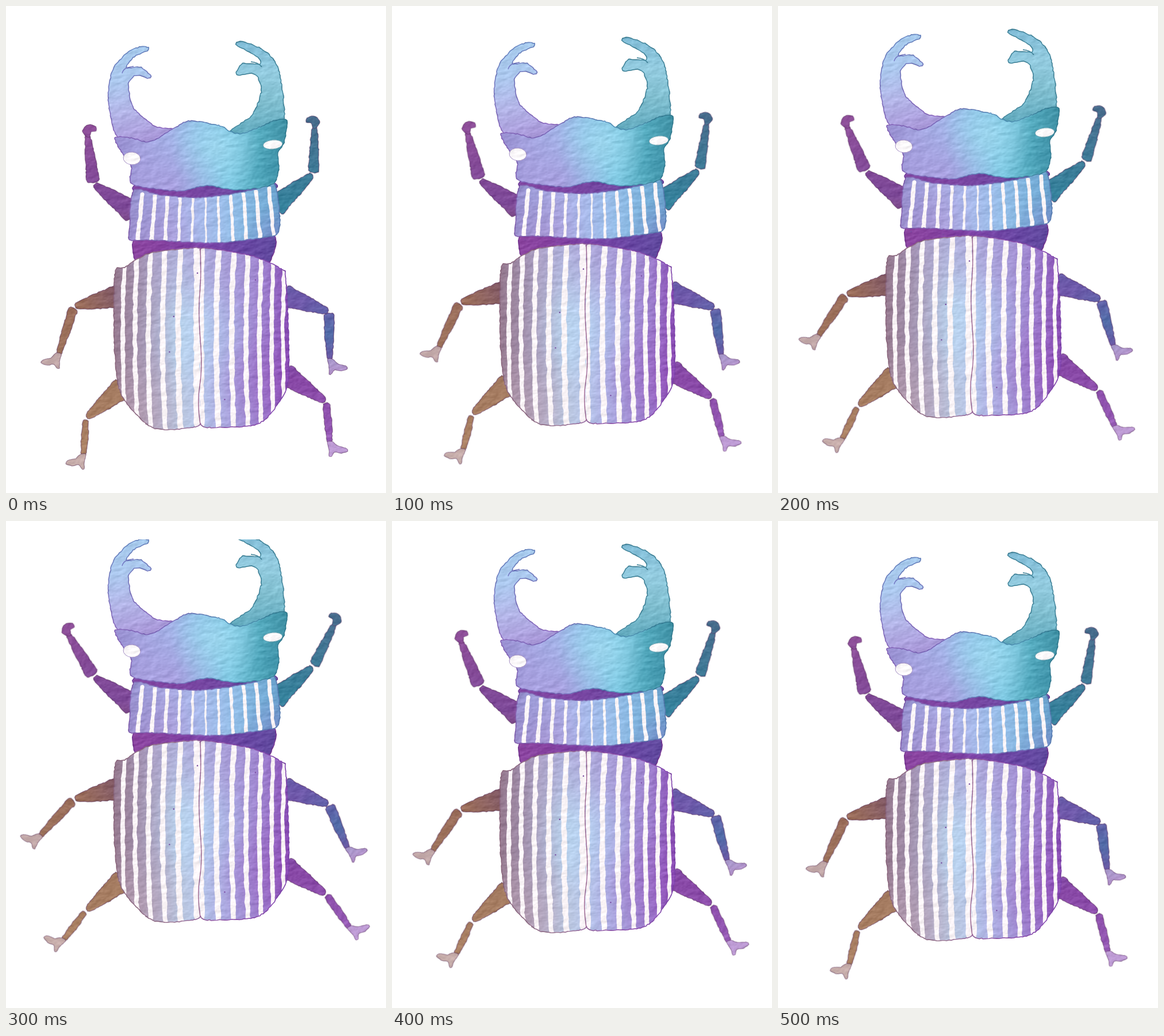
Write an HTML page with a canvas that moves like this. It is 661 px wide and 847 px high and loops after 600 ms.

```html
<!DOCTYPE html>
<html lang="en">
<head>
<meta charset="utf-8">
<title>Watercolour beetle</title>
<style>
html, body { margin: 0; width: 100%; height: 100%; overflow: hidden; background: #fff; }
canvas { display: block; width: 661px; height: 847px; }
</style>
</head>
<body>
<canvas id="stage" width="661" height="847"></canvas>
<script>
const W = 661, H = 847;
const stage = document.getElementById('stage').getContext('2d');
let ctx;

let seed = 7;
const rand = () => (seed = (seed * 16807) % 2147483647) / 2147483647;
const jitter = a => (rand() - 0.5) * 2 * a;
const mix = (a, b, t) => a + (b - a) * t;

// Paper relief from value noise on a wrapping lattice
const N = 128;
const lattice = Float32Array.from({ length: N * N }, rand);
function noise(x, y) {
  const ix = Math.floor(x), iy = Math.floor(y);
  const ease = f => f * f * (3 - 2 * f);
  const u = ease(x - ix), v = ease(y - iy);
  const at = (i, j) => lattice[((iy + j) & (N - 1)) * N + ((ix + i) & (N - 1))];
  return mix(mix(at(0, 0), at(1, 0), u), mix(at(0, 1), at(1, 1), u), v);
}
const relief = new Float32Array(W * H);
for (let y = 0; y < H; y++)
  for (let x = 0; x < W; x++)
    relief[y * W + x] = noise(x / 11 + y / 40, y / 6) + 0.35 * noise(x / 4, y / 2.5 + x / 20);

function grain() {
  const img = ctx.getImageData(0, 0, W, H), d = img.data;
  for (let i = 2 * W; i < W * (H - 2); i++) {
    if (!d[i * 4 + 3]) continue;
    const k = (relief[i + W + 1] - relief[i - W - 1]) * 30 + 2;
    for (let c = 0; c < 3; c++) d[i * 4 + c] += k;
  }
  ctx.putImageData(img, 0, 0);
}

// Closed Catmull-Rom outline through the points, with a slightly torn edge
function outline(p, rough = 0.8) {
  const path = new Path2D(), len = p.length;
  p.forEach((b, i) => {
    const a = p[(i + len - 1) % len], c = p[(i + 1) % len], d = p[(i + 2) % len];
    const steps = Math.max(2, Math.round(Math.hypot(c[0] - b[0], c[1] - b[1]) / 3.5));
    for (let s = 0; s < steps; s++) {
      const t = s / steps;
      const [x, y] = [0, 1].map(k => b[k] + 0.4 * t * (c[k] - a[k])
        + t * t * (0.8 * a[k] - 2.6 * b[k] + 2.2 * c[k] - 0.4 * d[k])
        + t * t * t * (-0.4 * a[k] + 1.6 * b[k] - 1.6 * c[k] + 0.4 * d[k]));
      path.lineTo(x + jitter(rough), y + jitter(rough));
    }
  });
  path.closePath();
  return path;
}
const points = text => text.split(' ').map(s => s.split(',').map(Number));
const shape = text => outline(points(text));

function lin(x1, y1, x2, y2, ...colors) {
  const g = ctx.createLinearGradient(x1, y1, x2, y2);
  colors.forEach((c, i) => g.addColorStop(i / (colors.length - 1), c));
  return g;
}
const across = (...colors) => lin(190, 0, 490, 0, ...colors);
function glow(x, y, r, color, alpha = 'aa') {
  const g = ctx.createRadialGradient(x, y, 0, x, y, r);
  g.addColorStop(0, color + alpha);
  g.addColorStop(1, color + '00');
  return g;
}
function paint(path, fills, edge, width = 1.6) {
  for (const f of fills) { ctx.fillStyle = f; ctx.fill(path); }
  if (edge) line(path, edge, width);
}
function line(path, color, width = 1.5) {
  ctx.strokeStyle = color;
  ctx.lineWidth = width;
  ctx.stroke(path);
}
function inside(path, draw) {
  ctx.save();
  ctx.clip(path);
  draw();
  ctx.restore();
}
function sprite(draw) {
  const c = document.createElement('canvas');
  c.width = W;
  c.height = H;
  ctx = c.getContext('2d', { willReadFrequently: true });
  ctx.lineJoin = 'round';
  draw();
  grain();
  return c;
}

// White hand-painted band; xAt gives its centre from top (0) to bottom (1)
function stripe(width, xAt, top, bottom) {
  const left = [], right = [], steps = Math.ceil((bottom - top) / 11);
  for (let s = 0; s <= steps; s++) {
    const t = s / steps, y = mix(top, bottom, t);
    const x = xAt(t) + jitter(0.8), half = width / 2 * (0.9 + rand() * 0.3);
    left.push([x - half, y]);
    right.unshift([x + half, y]);
  }
  paint(outline([...left, ...right], 0.4), ['#f8f2f5']);
}

// Leg segment from a to b, leaving a small gap at a
function segment(a, b, wa, wb) {
  const dx = b[0] - a[0], dy = b[1] - a[1], len = Math.hypot(dx, dy);
  const near = [], far = [];
  for (let s = 0; s <= 4; s++) {
    const t = mix(4 / len, 1, s / 4);
    const w = mix(wa, wb, t) + 2 * Math.sin(Math.PI * t);
    const x = a[0] + dx * t, y = a[1] + dy * t;
    near.push([x - dy / len * w, y + dx / len * w]);
    far.unshift([x + dy / len * w, y - dx / len * w]);
  }
  return outline([...near, ...far]);
}

// side: -1 left, 1 right; swing: degrees turned about the knee at full stretch
const legs = [
  { side: -1, hip: [222, 359], knee: [152, 309], ankle: [142, 226], girth: 10, swing: -24 },
  { side: 1, hip: [468, 348], knee: [535, 292], ankle: [537, 211], girth: 8, swing: 25 },
  { side: -1, hip: [194, 505], knee: [118, 523], ankle: [92, 604], girth: 7, swing: 25 },
  { side: 1, hip: [484, 504], knee: [562, 532], ankle: [563, 614], girth: 8, swing: -22 },
  { side: -1, hip: [203, 664], knee: [139, 717], ankle: [135, 779], girth: 4, swing: 34 },
  { side: 1, hip: [485, 641], knee: [557, 688], ankle: [563, 757], girth: 5, swing: -30 }
];
const boot = points('-4,1 5,0 14,8 28,12 31,17 20,21 9,19 3,26 -1,26 -1,14');
const fist = points('4,0 9,-9 4,-17 -5,-20 -14,-16 -15,-9 -6,-7 -3,2');

const legFills = side => side < 0
  ? [lin(0, 200, 0, 800, '#8c4c96', '#7b4796', '#966857', '#a1785e', '#aa8062'), glow(198, 500, 70, '#74506f')]
  : [lin(0, 200, 0, 800, '#476c8c', '#33809a', '#6a58a8', '#8646a4', '#9c62bc'), glow(562, 570, 75, '#4f6ba6', 'ff')];
const legEdge = 'rgba(70, 25, 75, .4)';

function thigh({ side, hip, knee }) {
  paint(segment(knee, hip, 4, 18), legFills(side), legEdge);
}
function shin({ side, knee, ankle, girth }) {
  paint(segment(knee, ankle, girth, 4), legFills(side), legEdge);
  const front = ankle[1] < knee[1];
  const foot = (front ? fist : boot).map(([x, y]) => [ankle[0] + side * x, ankle[1] + y]);
  const fills = legFills(side);
  if (!front) fills.push('rgba(225, 215, 240, .5)');
  paint(outline(foot, 0.5), fills, legEdge, 1.3);
}

function horns() {
  paint(shape('248,72 246,78 224,88 209,107 235,107 252,122 248,126 230,120 218,126 213,140 222,178 260,209 292,216 240,240 195,230 181,185 178,150 187,108 215,78 235,71'),
    [lin(205, 75, 240, 230, '#a4c8ea', '#aac6ec', '#b2b4e6', '#a898d8')], lin(200, 80, 230, 225, '#627fba', '#8560b6'));
  paint(shape('399,67 404,62 418,64 440,72 460,87 474,110 483,165 478,206 410,225 391,217 428,190 444,150 440,128 429,117 405,121 400,117 412,100 441,101 438,89 411,74'),
    [lin(440, 65, 450, 220, '#7fbad4', '#92cade', '#7ebccd', '#62aabe')], '#3f8197');
  line(new Path2D('M202 117Q204 109 212 107L222 105'), '#6b6fba');
  line(new Path2D('M426 97Q439 98 445 106'), '#3f8197');
}

function wings() {
  const shell = shape('191,458 205,455 250,430 333,420 338,424 345,421 430,435 480,458 487,475 492,600 488,665 455,715 425,730 350,733 338,727 330,732 280,737 245,728 200,675 189,600 188,500');
  paint(shell, [
    across('#94788e', '#9e8ca8', '#aeacca', '#b8cde8', '#b5c4e8', '#aaa8de', '#a292d4', '#9a7aca', '#864cb2'),
    glow(330, 415, 130, '#9f84c4', '88'),
    glow(225, 710, 120, '#bba2b2', '99'),
    glow(478, 650, 110, '#9048b4', '77'),
    glow(340, 570, 90, '#b4dcf6', '66')
  ]);
  inside(shell, () => {
    for (const side of [-1, 1])
      for (let k = 0; k < (side < 0 ? 6 : 7); k++) {
        const x = 337 + side * (4.5 + 29.5 * k - 0.9 * k * k);
        const width = k ? 9.5 - 0.5 * k : 8.5 - 1.5 * side;
        const sway = k ? 4.5 : 1;
        stripe(width, t => x - sway * Math.sin(Math.PI * t), 412, 745);
      }
  });
  paint(shell, [], across('#87637a', '#93708c', '#8c50a8', '#7a40a8'));
  line(new Path2D('M338 424Q340 470 337 500T338 580T337 660T338 728'), '#95608c', 1.4);
}

function thorax() {
  const plate = shape('222,321 270,329 345,333 430,320 466,309 476,368 471,397 430,405 360,412 250,407 216,407 215,388');
  paint(plate, [
    across('#9284c4', '#9a98d4', '#a8a8e0', '#a6b8e8', '#94bce6', '#78aed8', '#5f96c2'),
    glow(260, 412, 80, '#a488c8', '88'),
    glow(470, 400, 55, '#7a80c4', '99')
  ]);
  inside(plate, () => {
    for (let i = 0; i <= 10; i++) {
      const arc = (i - 4) ** 2 * 0.5;
      stripe(Math.min(6.5, 3 + Math.abs(i - 5)), t => mix(237 + 22 * i, 229 + 23.7 * i, t), 333 - arc, 413 - arc / 2);
    }
  });
  paint(plate, [], across('#7d57a8', '#8270b8', '#4f79ac'));
}

function head() {
  const skull = shape('190,229 215,229 250,236 285,217 318,200 372,208 390,218 410,222 440,211 468,199 488,198 489,208 483,240 473,254 474,285 462,311 400,320 350,312 300,322 225,312 216,300 218,279 199,251');
  paint(skull, [
    across('#968cce', '#a3a2de', '#a0b0e4', '#8cc0e4', '#7cc6e0', '#54aabe', '#3b8ca0'),
    glow(290, 318, 90, '#a892d8'),
    glow(365, 245, 80, '#a6dcf0', '99'),
    glow(465, 280, 50, '#3a8fa8', '77')
  ], across('#7f5db2', '#7566b4', '#4f8fb4', '#2c7488'));
  for (const [x, y, rx, ry, tilt, edge] of [[219, 265, 15, 11, 0.1, '#a08cc0'], [464, 241, 17, 8, -0.1, '#5f9cac']]) {
    const eye = new Path2D();
    eye.ellipse(x, y, rx, ry, tilt, 0, 7);
    paint(eye, ['#f8f5f7'], edge, 1);
  }
}

const body = sprite(() => {
  legs.forEach(thigh);
  paint(shape('229,400 340,406 463,397 457,448 420,455 260,455 226,446'),
    [across('#8c449e', '#86429f', '#7c42a6', '#6644a0', '#5c4a9c')], '#74358f');
  horns();
  wings();
  paint(shape('230,310 340,308 462,306 464,322 400,336 340,341 230,325'),
    [across('#8449a4', '#7c43a0', '#6d46a0', '#515ca2')], '#6a3a94');
  thorax();
  head();
  for (let i = 0; i < 7; i++) {
    const speck = new Path2D();
    speck.arc(mix(230, 450, rand()), mix(280, 700, rand()), 1.2, 0, 7);
    paint(speck, ['#75489e']);
  }
});
const shins = sprite(() => legs.forEach(shin));

function draw(pose) {
  const k = pose / 3;
  stage.fillStyle = '#fff';
  stage.fillRect(0, 0, W, H);
  stage.save();
  stage.beginPath();
  stage.rect(0, 32, W, H);
  stage.clip();
  stage.translate(0, -Math.round(39 * k ** 1.55));
  for (const { knee: [x, y], ankle, swing } of legs) {
    const box = [x - 65, Math.min(y, ankle[1]) - 24, 130, Math.abs(y - ankle[1]) + 54];
    stage.save();
    stage.translate(x, y);
    stage.rotate(swing * k ** 1.1 * Math.PI / 180);
    stage.translate(-x, -y);
    stage.drawImage(shins, ...box, ...box);
    stage.restore();
  }
  stage.drawImage(body, 0, 0);
  stage.restore();
}

let shown = -1;
function tick() {
  const step = Math.floor(performance.now() / 100) % 6;
  const pose = 3 - Math.abs(3 - step);
  if (pose !== shown) draw(shown = pose);
  requestAnimationFrame(tick);
}
tick();
</script>
</body>
</html>
```
